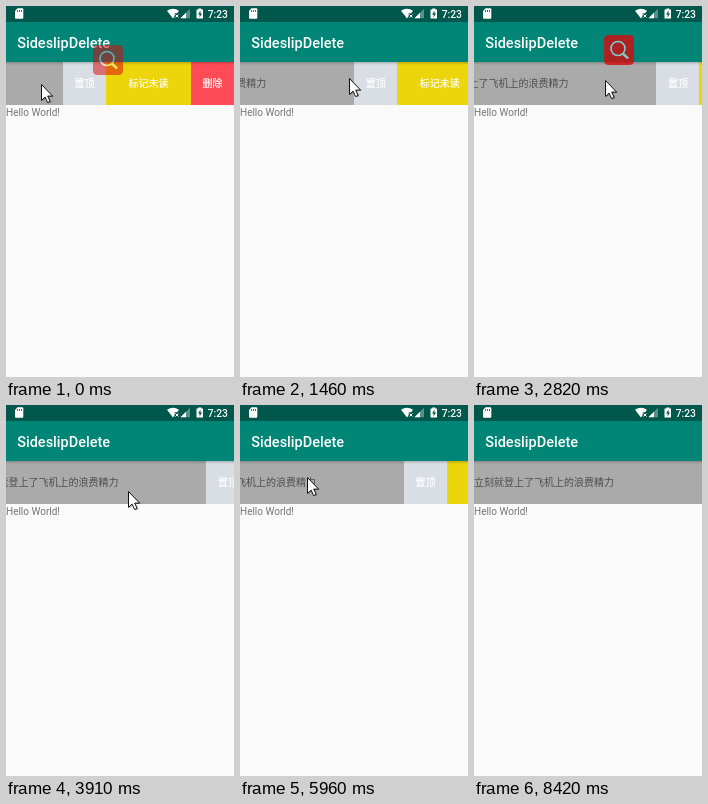
Animation of 228 by 371 pixels, one loop 8670 ms. Source, as an HTML page:

```html
<!DOCTYPE html>
<html lang="zh-CN">
<head>
<meta charset="utf-8">
<title>Sideslip delete</title>
<style>
html, body { margin: 0; width: 100%; height: 100%; overflow: hidden; background: #fafafa; }
svg { display: block; width: 228px; height: 371px; }
text { font: 10px Roboto, "Noto Sans CJK SC", "Noto Sans CJK JP", sans-serif; }
.label { fill: #fff; stroke: #fff; stroke-width: .2; text-anchor: middle; }
.title { font-size: 14.5px; font-weight: 500; fill: #fff; }
.clock { font-size: 10.3px; font-weight: 500; fill: #fff; }
</style>
</head>
<body>
<svg viewBox="0 0 228 371">
  <defs>
    <linearGradient id="shade" x2="0" y2="1">
      <stop stop-color="#000" stop-opacity=".2"/>
      <stop offset="1" stop-color="#000" stop-opacity="0"/>
    </linearGradient>
    <mask id="cutout">
      <rect width="30" height="30" rx="4" fill="#fff"/>
      <use href="#lens" stroke="#000"/>
    </mask>
    <g id="lens" fill="none" stroke-width="1.6" stroke-linecap="round">
      <circle cx="14" cy="13.5" r="7"/>
      <path d="M19.3 19l4 3.7" stroke-width="2.5"/>
    </g>
  </defs>

  <rect width="228" height="371" fill="#fafafa"/>
  <text y="109.5" fill="#757575">Hello World!</text>

  <g id="row">
    <rect x="-228" y="56" width="228" height="43" fill="#aaa"/>
    <text x="-228" y="81.2" fill="#4e4e4e">立刻就登上了飞机上的浪费精力</text>
    <g shape-rendering="crispEdges">
      <rect y="56" width="171" height="43" fill="#d9dee4"/>
      <rect x="42.75" y="56" width="128" height="43" fill="#ecd50a"/>
      <rect x="128.25" y="56" width="43" height="43" fill="#ff4a57"/>
    </g>
    <text class="label" x="21.5" y="81.2">置顶</text>
    <text class="label" x="85.5" y="81.2">标记未读</text>
    <text class="label" x="149.5" y="81.2">删除</text>
  </g>

  <rect y="56" width="228" height="3" fill="url(#shade)"/>
  <rect width="228" height="56" fill="#008577"/>
  <rect width="228" height="16" fill="#00574b"/>
  <text class="title" x="11.2" y="41.7">SideslipDelete</text>

  <g fill="#fff">
    <path d="M11.5 2.3H16.3q1 0 1 1v8.5q0 1-1 1H10q-1 0-1-1V5z"/>
    <path d="M161 4.8q6-4.2 12 0l-1.8 2.4h-2.5v2.9L167 12.4z"/>
    <path d="M169.5 8.5l3 3m0-3l-3 3" stroke="#fff"/>
    <path d="M184 2.8v9.5h-9.5z" opacity=".35"/>
    <path d="M180 6.8v5.5h-5.5z"/>
    <path d="M192.3 2.5h3v1h1.7v9h-6.5v-9h1.8z"/>
  </g>
  <path d="M194.5 4.5l-2.4 4h1.5v3l2.4-4h-1.5z" fill="#00574b"/>
  <path d="M11.5 4v2m2-2v2m2-2v2" stroke="#00574b" stroke-width=".8"/>
  <text class="clock" x="201.7" y="11.6">7:23</text>

  <g id="popup">
    <rect width="30" height="30" rx="4" fill="#d70a0f" opacity=".8" mask="url(#cutout)"/>
    <use href="#lens" stroke="#fff" opacity=".55"/>
  </g>
  <g id="cursor">
    <path d="M1.5 1.5v16l3.7-3.4 2.6 5.4 2.7-1.2-2.5-5.3h5z" fill="#000" opacity=".22"/>
    <path d="M.5 .5v15.9l3.6-3.3 2.5 5.5 2.6-1.2-2.5-5.3h4.9z" fill="#fff" stroke="#111"/>
  </g>
</svg>
<script>
const LOOP = 8670, STEP = 150, FIRST_STEP = 110;
const OPEN = 57, CLOSED = 228, FLING = 57;
const SETTLE = 250, POPUP_LIFE = 590, POPUP_FADE = 180;
const EXIT = { start: 7745, end: 8360, x: 190, y: 385 };

const byId = id => document.getElementById(id);
const row = byId('row'), popup = byId('popup'), cursor = byId('cursor');
const clamp = (v, lo, hi) => Math.min(hi, Math.max(lo, v));
const progress = (t, from, to) => clamp((t - from) / (to - from), 0, 1);
const lerp = (a, b, k) => a + (b - a) * k;
const easeOut = k => 1 - (1 - k) ** 2;

// A press dragged sideways; without movement it is a tap.
const drag = (down, up, from, to, y) => ({ down, up, from, to, y });
const drags = [
  drag(-700, -470, 98, 88, 84),
  drag(380, 770, 22, 45, 77),
  drag(1110, 1560, 52, 125.5, 72),
  drag(2360, 2800, 180, 130.5, 74),
  drag(3650, 3940, 150, 112, 86),
  drag(4610, 4940, 134, 82.5, 85),
  drag(5600, 5985, 131, 62.6, 72),
  drag(7050, 7050, 32, 32, 79)
];

// A tap closes the row, a long drag flings it, a short one lets it spring back.
let rest = OPEN;
for (const d of drags) {
  const travel = d.to - d.from;
  d.rest = rest;
  d.release = clamp(rest + travel, OPEN, CLOSED);
  if (!travel) rest = CLOSED;
  else if (Math.abs(d.release - rest) > FLING) rest = travel > 0 ? CLOSED : OPEN;
  d.settled = rest;
}

function move(node, x, y = 0) {
  node.setAttribute('transform', `translate(${x} ${y})`);
}

function pointerAt(t, d, next) {
  if (t < d.up) return [lerp(d.from, d.to, progress(t, d.down, d.up)), d.y];
  if (next) {
    const k = easeOut(progress(t, d.up, next.down));
    return [lerp(d.to, next.from, k), lerp(d.y, next.y, k)];
  }
  const k = progress(t, EXIT.start, EXIT.end);
  return [lerp(d.to, EXIT.x, k), lerp(d.y, EXIT.y, k)];
}

function draw(time) {
  const t = Math.max(0, FIRST_STEP + Math.floor((time - FIRST_STEP) / STEP) * STEP);
  const index = drags.filter(d => d.down <= t).length - 1;
  const d = drags[index];
  const [x, y] = pointerAt(t, d, drags[index + 1]);

  move(cursor, Math.round(x), Math.round(y));
  move(row, t < d.up
    ? clamp(d.rest + x - d.from, OPEN, CLOSED)
    : lerp(d.release, d.settled, easeOut(progress(t, d.up, d.up + SETTLE))));

  const age = t - d.up;
  const shown = age >= 0 && d.from !== d.to;
  popup.setAttribute('opacity', shown ? clamp((POPUP_LIFE - age) / POPUP_FADE, 0, 1) : 0);
  move(popup, Math.round(d.to) - 1, d.y - 45);
}

const start = performance.now();
function frame() {
  draw((performance.now() - start) % LOOP);
  requestAnimationFrame(frame);
}
frame();
</script>
</body>
</html>
```
